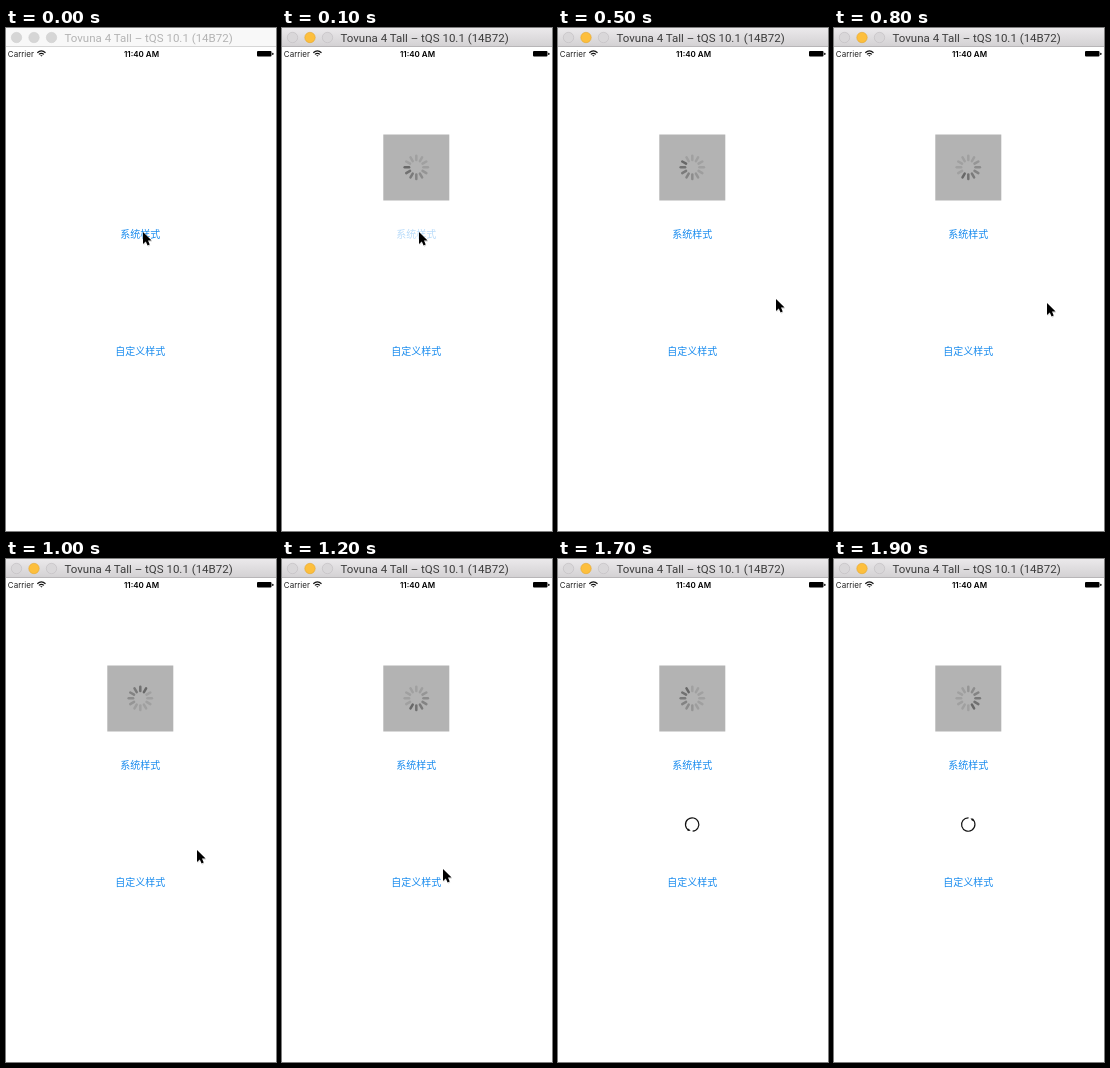
An HTML page that plays this animation: 270x503 px, repeating every 2 s.

```html
<!DOCTYPE html>
<html lang="zh">
<head>
<meta charset="utf-8">
<style>
  html, body { margin: 0; width: 100%; height: 100%; overflow: hidden; background: #fff; }
  svg { display: block; width: 270px; height: 503px; }
  text { font-family: Inter, sans-serif; }
  #title { font: 11.5px Roboto, sans-serif; }
  .status { font-size: 8px; }
  .button { font: 10px "Noto Sans CJK SC", "Noto Sans CJK", sans-serif; fill: #168aee; text-anchor: middle; }
</style>
</head>
<body>
<svg viewBox="0 0 270 503">
  <defs>
    <linearGradient id="chrome" x2="0" y2="1">
      <stop stop-color="#ebe9eb"/>
      <stop offset="1" stop-color="#d3d1d3"/>
    </linearGradient>
  </defs>

  <rect id="bar" width="270" height="18.5"/>
  <path id="barLine" d="M0 18.5H270"/>
  <g id="lights">
    <circle cx="10.5" cy="9.5" r="5.2"/>
    <circle cx="28" cy="9.5" r="5.2"/>
    <circle cx="45.5" cy="9.5" r="5.2"/>
  </g>
  <text id="title" x="58.5" y="13.7">Tovuna 4 Tall – tQS 10.1 (14B72)</text>

  <text class="status" x="1.8" y="28.8" fill="#222">Carrier</text>
  <g fill="none" stroke="#111" stroke-width="1.2">
    <path d="M31.3 24.7Q35.4 21.2 39.5 24.7M32.9 26.4Q35.4 24.3 37.9 26.4"/>
    <path d="M34.1 27.2h2.6l-1.3 1.4z" fill="#111" stroke="none"/>
  </g>
  <text class="status" x="135.5" y="28.8" font-weight="600" text-anchor="middle">11:40 AM</text>
  <rect x="251" y="23" width="14.5" height="5.6" rx="1"/>
  <rect x="266.2" y="24.7" width="1.2" height="2.2" rx=".5"/>

  <g id="hud">
    <rect x="101.3" y="106.5" width="66" height="66" fill="#b3b3b3"/>
    <g id="spokes" transform="translate(134.3 139.3)" stroke-width="2.5" stroke-linecap="round"></g>
  </g>

  <text id="systemButton" class="button" x="134.2" y="210">系统样式</text>
  <text id="customButton" class="button" x="134.2" y="327">自定义样式</text>

  <g id="ring">
    <path d="M2.6 -6.2A6.7 6.7 0 1 1 -1.2 -6.6" fill="none" stroke="#111" stroke-width="1.2"/>
    <path d="M.8 -6.7L4.3 -6.6L3.1 -4.4z" fill="#111"/>
  </g>

  <g id="cursor">
    <path d="M0 0V12L2.8 9.4L4.6 13.5L6.7 12.6L5 8.6H8.6z" transform="translate(.6 1.2)" opacity=".15"/>
    <path d="M0 0V12L2.8 9.4L4.6 13.5L6.7 12.6L5 8.6H8.6z" stroke="#fff" stroke-width=".9" paint-order="stroke"/>
  </g>
</svg>
<script>
const STEP = 100, LOOP = 2000;
const SPOKES = 12, SPOKES_PER_STEP = 3.11;
const el = id => document.getElementById(id);
const set = (node, attributes) => {
  for (const name in attributes) node.setAttribute(name, attributes[name]);
};
const show = (node, visible) => set(node, { visibility: visible ? 'visible' : 'hidden' });

const spokes = Array.from({ length: SPOKES }, (_, i) => {
  const line = document.createElementNS('http://www.w3.org/2000/svg', 'line');
  set(line, { y1: -7.2, y2: -11.6, transform: `rotate(${i * 360 / SPOKES})` });
  return el('spokes').appendChild(line);
});

// Cursor tip: step, x, y
const cursorPath = [
  [0, 137, 204], [2, 137, 204], [3, 157, 221], [4, 202, 258], [5, 218, 271], [7, 218, 271],
  [8, 213, 275], [10, 191, 291], [12, 161, 310], [13, 141, 319], [14, 137, 320], [17, 137, 320]
];

function cursorAt(step) {
  const i = Math.max(1, cursorPath.findIndex(point => point[0] >= step));
  const [s0, x0, y0] = cursorPath[i - 1], [s1, x1, y1] = cursorPath[i];
  const k = (step - s0) / (s1 - s0);
  return [x0 + (x1 - x0) * k, y0 + (y1 - y0) * k];
}

function drawWindow(active) {
  set(el('bar'), { fill: active ? 'url(#chrome)' : '#f8f8f8' });
  set(el('barLine'), { stroke: active ? '#b8b6b8' : '#d6d6d6' });
  set(el('title'), { fill: active ? '#3c3c3c' : '#b3b3b3' });
  [...el('lights').children].forEach((light, i) => {
    const yellow = active && i === 1;
    set(light, {
      fill: yellow ? '#fdbf3d' : active ? '#d9d7d9' : '#d6d6d6',
      stroke: yellow ? '#e3a631' : active ? '#bfbdbf' : '#d0d0d0',
      'stroke-width': .6
    });
  });
}

function drawSpinner(step) {
  const head = Math.floor(9.6 + (step - 1) * SPOKES_PER_STEP);
  spokes.forEach((spoke, i) => {
    const age = ((head - i) % SPOKES + SPOKES) % SPOKES;
    const grey = Math.min(160, 104 + age * 9);
    set(spoke, { stroke: `rgb(${grey},${grey},${grey})` });
  });
}

function draw(step) {
  drawWindow(step > 0);
  show(el('hud'), step > 0);
  drawSpinner(step);

  set(el('systemButton'), { opacity: step === 1 ? .3 : step === 2 ? .85 : 1 });
  set(el('customButton'), { opacity: step === 14 ? .25 : step === 15 ? .75 : 1 });

  show(el('ring'), step >= 14);
  const angle = (step - 15) * SPOKES_PER_STEP * 360 / SPOKES;
  set(el('ring'), { transform: `translate(134.2 265.5) rotate(${angle})` });

  const cursorVisible = step < 17;
  show(el('cursor'), cursorVisible);
  if (cursorVisible) set(el('cursor'), { transform: `translate(${cursorAt(step)})` });
}

const start = performance.now();
function tick() {
  draw(Math.floor((performance.now() - start) % LOOP / STEP));
  requestAnimationFrame(tick);
}
tick();
</script>
</body>
</html>
```
